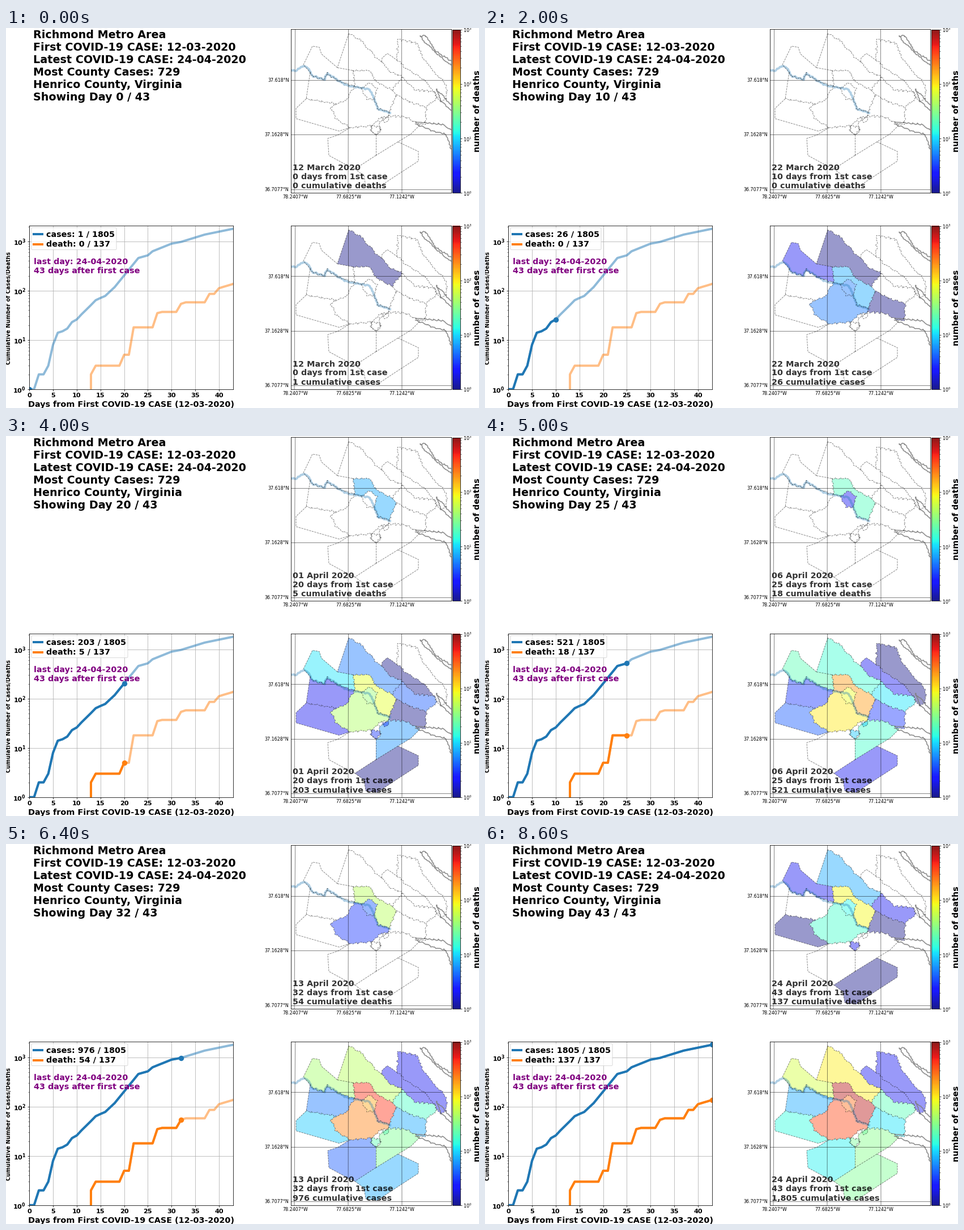
Animation of 835 by 671 pixels, one loop 8800 ms. Source, as a matplotlib script:

```python
import numpy as np
import matplotlib.pyplot as plt
from matplotlib.animation import FuncAnimation
from matplotlib.cm import ScalarMappable
from matplotlib.collections import LineCollection, PolyCollection
from matplotlib.colors import ListedColormap, LogNorm
from matplotlib.patches import FancyBboxPatch

W, H, DAYS = 835, 671, 43
PT = 0.72  # points per pixel at 100 dpi
BLUE, ORANGE = "tab:blue", "tab:orange"

plt.rcParams["font.family"] = "DejaVu Sans"
fig = plt.figure(figsize=(W / 100, H / 100), dpi=100, facecolor="white")


def totals(*keys):
    """Daily totals: zero before the first key, geometric between keys."""
    days, counts = zip(*keys)
    day = np.arange(DAYS + 1)
    curve = np.rint(np.exp(np.interp(day, days, np.log(counts)))).astype(int)
    return np.where(day < days[0], 0, curve)


CASES = totals((0, 1), (1, 1), (2, 2), (3, 2), (4, 3), (5, 8), (6, 14), (8, 17),
               (9, 23), (10, 26), (14, 64), (16, 78), (18, 118), (23, 460),
               (25, 521), (26, 630), (30, 900), (32, 976), (37, 1374), (43, 1805))
DEATHS = totals((13, 2), (14, 3), (19, 3), (20, 5), (21, 5), (22, 18), (26, 18),
                (27, 35), (28, 37), (31, 37), (32, 54), (33, 58), (37, 58),
                (38, 86), (39, 86), (40, 112), (43, 137))


def axes_at(left, top, right, bottom, **kw):
    return fig.add_axes([left / W, 1 - bottom / H, (right - left) / W,
                         (bottom - top) / H], **kw)


overlay = axes_at(0, 0, W, H, zorder=5)
overlay.set(xlim=(0, W), ylim=(H, 0))
overlay.axis("off")


def label(x, y, text="", size=14.4, weight="bold", **kw):
    return overlay.text(x, y, text, fontsize=size * PT, fontweight=weight, **kw)


def label_lines(x, y, pitch, lines, **kw):
    return [label(x, y + i * pitch, s, **kw) for i, s in enumerate(lines)]


def side_label(x, y, text, **kw):
    label(x, y, text, rotation=90, rotation_mode="anchor", ha="center",
          va="baseline", **kw)


# ---- county boundaries, in pixels of the upper map ----
edges = {}


def ragged(points, amount=1.0):
    """Resample a polyline and shake it by a fixed field, keeping its ends."""
    pts = np.array(points, float)
    along = np.r_[0, np.cumsum(np.hypot(*np.diff(pts, axis=0).T))]
    s = np.linspace(0, along[-1], max(int(along[-1] / 2), 2))
    x, y = (np.interp(s, along, pts[:, k]) for k in (0, 1))
    fade = amount * np.clip(np.minimum(s, s[-1] - s) / 3, 0, 1)
    dx = 1.2 * np.sin(0.6 * x + 0.8 * y) + np.sin(1.9 * x + 2.7 * y)
    dy = 1.2 * np.sin(0.8 * x - 0.5 * y) + np.sin(2.3 * x - 1.7 * y)
    return list(zip(x + fade * dx, y + fade * dy))


def border(name, *points):
    edges[name] = [points[0]] + ragged(points)[1:-1] + [points[-1]]


def straight(name, *points):
    edges[name] = list(points)


def ring(names):
    """Chain edges into one outline, turning each one as needed."""
    parts = [edges[n] for n in names.split()]
    line = list(parts[0])
    if len(parts) > 1 and line[-1] not in (parts[1][0], parts[1][-1]):
        line.reverse()
    for part in parts[1:]:
        line += part if part[0] == line[-1] else part[::-1]
    return line


A, B, C, D, E = (585, 70), (612, 75), (615, 103), (537, 78), (530, 125)
F, G, I, J, K = (584, 134), (607, 176), (628, 106), (650, 126), (682, 110)
L, M, N, O, P = (689, 118), (677, 148), (675, 155), (700, 87), (663, 60)
Q, R, T, U, X = (690, 57), (757, 113), (742, 140), (728, 169), (645, 173)
Y, Z, S, V, NORTH = (653, 188), (653, 225), (616, 249), (692, 201), (605, 10)

straight("goo", A, (557, 46), (553, 34), (541, 32), (525, 65), D)
border("goo_pow", D, (542, 85), (562, 91), (567, 80), (585, 93), C)
straight("goo_han", A, B)
border("goo_hen", B, C)
border("han_hen", B, (641, 75), (652, 93), K)
border("han_nk", K, O)
border("han_kw", O, (678, 77), P)
border("han", P, (646, 44), (629, 24), NORTH)
straight("han_w", NORTH, A)
straight("hen_nk", K, L)
border("hen_cc", L, M)
border("hen_che", M, (657, 143), J)
border("hen_ric", J, (655, 108), (643, 96), I)
border("ric_che", I, (637, 125), J)
straight("hen_che_w", I, C)
straight("pow", D, E)
border("pow_ame", E, F)
border("pow_che", C, (602, 125), F)
border("ame_che", F, (573, 142), (583, 160), G)
straight("ame", G, (588, 182), (512, 160), (512, 142), E)
border("che_din", G, X)
border("che_s", X, (658, 160), N)
straight("che_cc", M, N)
border("nk_kw", O, (720, 109), R)
border("nk", R, (761, 122), T)
border("nk_cc", L, (711, 130), T)
border("cc", T, (740, 170), U)
border("cc_pg", N, (705, 157), U)
border("kw_kq", Q, (712, 75), (738, 92), R)
straight("kw", P, (664, 53), (673, 45), (681, 50), Q)
border("kq", Q, (692, 20), (727, 27), (737, 55), (760, 82), (777, 100),
       (778, 125), (768, 130), R)
border("pg_w", N, (659, 166), (662, 183), Y)
straight("pg", U, (731, 171), (715, 187), V)
straight("pg_sus", V, Z)
straight("pg_din", Y, Z)
border("din_pet", X, (644, 182), Y)
straight("din_sus", Z, S)
straight("din", S, (605, 244), (570, 225), (568, 195), (586, 189), G)
straight("sus", S, (632, 261), (635, 280), (655, 283), (685, 263),
         (728, 235), (728, 218), V)
border("pet", X, (656, 174), (663, 178), Y, (644, 182), X)
straight("hop", (664, 160), (676, 158), (675, 164), (668, 167), (664, 160))

# ---- counties: outline, then how cases and deaths grow ----
counties = []


def growth(first, peak, rise=None, ease=2.0):
    """One case from `first`, then log growth easing out from `rise` to `peak`."""
    rise = first if rise is None else rise

    def count(day):
        u = min(max((day - rise) / (DAYS - rise), 0), 1)
        return round(peak ** (1 - (1 - u) ** ease)) if day >= first else 0
    return count


def county(outline, cases, deaths=lambda day: 0):
    counties.append((ring(outline), cases, deaths))


county("goo goo_pow goo_hen goo_han", growth(6, 63, 8), growth(34, 2, ease=1))
county("goo_han han_hen han_nk han_kw han han_w", growth(0, 95, 14), growth(38, 7, 36))
county("goo_hen han_hen hen_nk hen_cc hen_che hen_ric hen_che_w",
       growth(4, 729), growth(13, 87, 12))
county("hen_che_w pow_che ame_che che_din che_s che_cc hen_che ric_che",
       growth(5, 350, 4), growth(27, 17, 26, ease=1))
county("hen_ric ric_che", growth(5, 260, 4), growth(22, 13, 20, ease=1))
county("goo_pow pow_che pow_ame pow", growth(14, 7, 17))
county("pow_ame ame_che ame", growth(13, 14, 16), growth(41, 1))
county("han_nk nk_kw nk nk_cc hen_nk", growth(12, 20, 16, ease=4), growth(39, 2))
county("hen_cc nk_cc cc cc_pg che_cc", growth(5, 11, 18), growth(40, 1))
county("kw kw_kq nk_kw han_kw", growth(19, 2, ease=4))
county("kq kw_kq", growth(23, 2, ease=4))
county("cc_pg pg pg_sus pg_din pg_w", growth(11, 31, 15, ease=4))
county("che_din din_pet pg_din din_sus din", growth(26, 12))
county("din_sus pg_sus sus", growth(20, 29, ease=1.2), growth(42, 1))
county("pet", growth(17, 27, ease=3), growth(39, 2))
county("hop", growth(17, 25, ease=3))

RIVER = [(502, 74), (511, 76), (524, 67), (533, 70), (542, 85), (562, 91),
         (567, 80), (585, 92), (604, 102), (640, 108), (650, 124), (657, 143), (678, 150)]
COASTS = [
    [(786, 58), (758, 40), (742, 14), (731, 14), (752, 38), (786, 66)],
    [(786, 136), (759, 107), (768, 129), (786, 146)],
    [(722, 166), (771, 170), (786, 180)],
    [(722, 169), (757, 183), (776, 187), (786, 214)],
]

norm = LogNorm(1, 1000)
jet = plt.get_cmap("jet")
bar_map = ListedColormap(1 - 0.9 * (1 - jet(np.linspace(0, 1, 256))[:, :3]))


def build_map(top, name):
    shift = top - 2.5
    ax = axes_at(502.5, top, 785.5, top + 289)
    ax.set(xlim=(502.5, 785.5), ylim=(291.5, 2.5), xticks=[], yticks=[])
    for spine in ax.spines.values():
        spine.set_linewidth(0.8 * PT)

    fills = PolyCollection([c[0] for c in counties], edgecolors="none", zorder=1)
    ax.add_collection(fills)
    ax.plot(*zip(*ragged(RIVER, 0.6)), color=BLUE, alpha=0.35, lw=3.8 * PT, zorder=2)
    ax.add_collection(LineCollection([ragged(c, 0.7) for c in COASTS], colors="gray",
                                     linewidths=1.6 * PT, alpha=0.9, zorder=2))
    ax.add_collection(LineCollection(list(edges.values()), colors="black", alpha=0.5,
                                     linewidths=0.9 * PT, linestyles=[(0, (3.7, 1.6))],
                                     zorder=3))

    small = dict(size=8, weight="normal")
    grid = dict(color="black", alpha=0.6, lw=0.8 * PT, zorder=3)
    for k in range(3):
        y, x = 92 + 96.3 * k, 510.5 + 94 * k
        ax.plot([502, 786], [y, y], **grid)
        ax.plot([x, x + k - 1.5], [2, 292], **grid)
        label(499.5, y + shift + 3, f"{37.618 - 0.45515 * k:.6g}°N", ha="right", **small)
        label(x, shift + 301, f"{78.2407 - 0.55825 * k:.4f}°W", ha="center", **small)

    cax = axes_at(787.8, top + 0.5, 802.3, top + 289)
    bar = fig.colorbar(ScalarMappable(norm, bar_map), cax=cax)
    bar.outline.set_linewidth(0.8 * PT)
    cax.tick_params(labelsize=8 * PT, length=3 * PT, width=0.7 * PT, pad=2 * PT)
    cax.tick_params(which="minor", length=1.8 * PT, width=0.5 * PT)
    side_label(836, top + 144.5, "number of " + name)
    notes = label_lines(505.5, shift + 251, 16, [""] * 3, color="black", alpha=0.8)
    return fills, notes


death_map = build_map(2.5, "deaths")
case_map = build_map(349, "cases")

# ---- line chart ----
chart = axes_at(41.2, 349.2, 401, 637.8)
chart.set_yscale("log")
chart.set(xlim=(0, DAYS), ylim=(1, 1805 * 1.15))
chart.set_xticks(range(0, 41, 5))
chart.set_yticks([10 ** k for k in range(4)],
                 [rf"$\mathbf{{10^{k}}}$" for k in range(4)])
chart.tick_params(labelsize=11.2 * PT, length=3 * PT, width=0.8 * PT, pad=3 * PT)
chart.tick_params(which="minor", length=1.8 * PT, width=0.5 * PT)
for tick in chart.get_xticklabels():
    tick.set_fontweight("bold")
for spine in chart.spines.values():
    spine.set_linewidth(0.8 * PT)
chart.set_axisbelow(True)
chart.grid(color="#b0b0b0", lw=0.8 * PT)
label(221, 669, "Days from First COVID-19 CASE (12-03-2020)", ha="center")
side_label(8.5, 494, "Cumulative Number of Cases/Deaths", size=9.6)


def build_series(values, color):
    chart.plot(range(DAYS + 1), values, color=color, alpha=0.5, lw=4 * PT)
    line, = chart.plot([], [], color=color, lw=4 * PT)
    dot, = chart.plot([], [], "o", color=color, ms=8 * PT)
    return values, line, dot


series = [build_series(CASES, BLUE), build_series(DEATHS, ORANGE)]

legend_box = FancyBboxPatch((47, 354.5), 146, 35, boxstyle="round,pad=2,rounding_size=2",
                            fc="white", ec="#cccccc", alpha=0.8, lw=0.9 * PT)
overlay.add_patch(legend_box)
for y, color in ((364, BLUE), (381.7, ORANGE)):
    overlay.plot([47, 66], [y, y], color=color, lw=4 * PT, solid_capstyle="butt")
legend_texts = label_lines(71, 368, 17.7, ["", ""])

label_lines(49, 417.5, 15.9, ["last day: 24-04-2020", "43 days after first case"],
            color="purple")
header = label_lines(48, 18, 22, [
    "Richmond Metro Area", "First COVID-19 CASE: 12-03-2020",
    "Latest COVID-19 CASE: 24-04-2020", "Most County Cases: 729",
    "Henrico County, Virginia", ""], size=19.2)


def shade(count):
    return jet(norm(count), alpha=0.4) if count else (1, 1, 1, 0)


def update(day):
    date = f"{12 + day:02d} March 2020" if day < 20 else f"{day - 19:02d} April 2020"
    header[-1].set_text(f"Showing Day {day} / {DAYS}")

    for (fills, notes), column, values, name in (
            (case_map, 1, CASES, "cases"), (death_map, 2, DEATHS, "deaths")):
        fills.set_facecolor([shade(c[column](day)) for c in counties])
        lines = (date, f"{day} days from 1st case",
                 f"{values[day]:,} cumulative {name}")
        for note, text in zip(notes, lines):
            note.set_text(text)

    for (values, line, dot), text, name in zip(series, legend_texts, ("cases", "death")):
        line.set_data(range(day + 1), values[:day + 1])
        dot.set_data([day], [values[day]])
        text.set_text(f"{name}: {values[day]} / {values[-1]}")
    legend_box.set_width(136 + 10 * len(str(CASES[day])))
    return []


anim = FuncAnimation(fig, update, frames=DAYS + 1, interval=200, repeat=True,
                     repeat_delay=0, blit=False)
plt.show()
```
